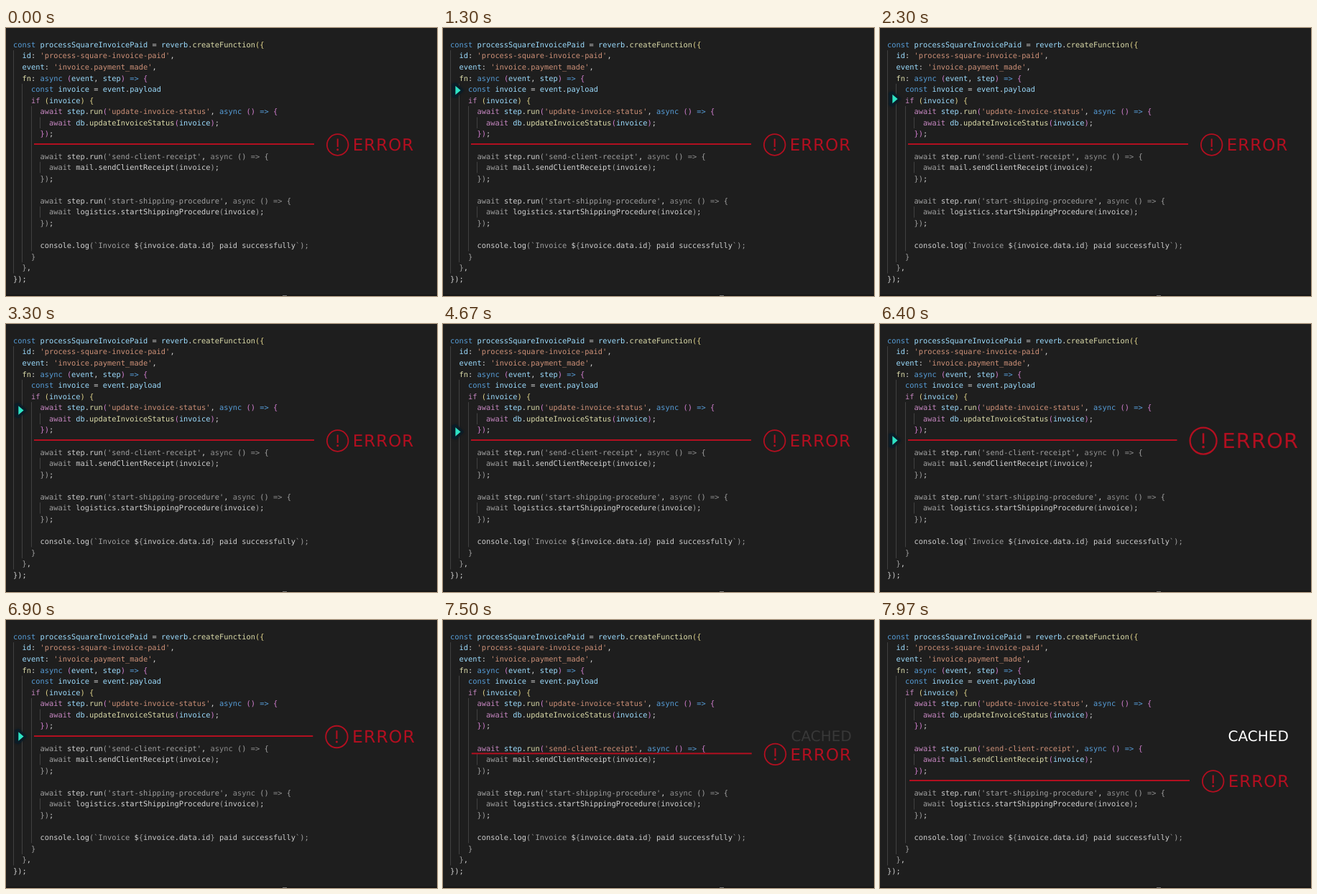
Animation of 600x374 px, one loop 8 s. Source, as an HTML page with a canvas:

```html
<!DOCTYPE html>
<html lang="en">
<head>
<meta charset="utf-8">
<title>Step function retry</title>
<style>
  html, body { margin: 0; width: 100%; height: 100%; overflow: hidden; background: #1e1e1e; }
  canvas { display: block; }
</style>
</head>
<body>
<canvas id="stage" width="600" height="374"></canvas>
<script>
const ctx = document.getElementById('stage').getContext('2d');
const WIDTH = 600, HEIGHT = 374, LOOP = 8000;
const LEFT = 10, CHAR = 6.24, BASELINE = 26.8, PITCH = 15.57;
const RED = '#b30f20';

const code = [
  "const processSquareInvoicePaid = reverb.createFunction({",
  "  id: 'process-square-invoice-paid',",
  "  event: 'invoice.payment_made',",
  "  fn: async (event, step) => {",
  "    const invoice = event.payload",
  "    if (invoice) {",
  "      await step.run('update-invoice-status', async () => {",
  "        await db.updateInvoiceStatus(invoice);",
  "      });",
  "",
  "      await step.run('send-client-receipt', async () => {",
  "        await mail.sendClientReceipt(invoice);",
  "      });",
  "",
  "      await step.run('start-shipping-procedure', async () => {",
  "        await logistics.startShippingProcedure(invoice);",
  "      });",
  "",
  "      console.log(`Invoice ${invoice.data.id} paid successfully`);",
  "    }",
  "  },",
  "});"
];

// First matching rule colours a token.
const rules = [
  [/^['`]/, '#ce9178'],
  [/^(const|async|=>)$/, '#569cd6'],
  [/^(await|if)$/, '#c586c0'],
  [/^(createFunction|run|log|fn|updateInvoiceStatus|sendClientReceipt|startShippingProcedure)$/, '#dcdcaa'],
  [/^\w/, '#9cdcfe'],
  [/^[(){}]$/, '#d37fd0'],
  [/./, '#d4d4d4']
];
const goldBracketRows = [0, 5, 21];

function toGray(hex) {
  const [r, g, b] = [1, 3, 5].map(i => parseInt(hex.slice(i, i + 2), 16));
  const level = Math.round(0.3 * r + 0.59 * g + 0.11 * b);
  return `rgb(${level},${level},${level})`;
}

const tokens = code.flatMap((line, row) =>
  [...line.matchAll(/'[^']*'|`[^$]*|\w+|=>|[^\s\w]/g)].map(match => {
    const text = match[0];
    const gold = goldBracketRows.includes(row) && /[(){}]/.test(text);
    const color = gold ? '#e2d58b' : rules.find(([pattern]) => pattern.test(text))[1];
    return { text, color, gray: toGray(color), x: LEFT + match.index * CHAR, y: BASELINE + row * PITCH };
  }));

const clamp = v => Math.min(1, Math.max(0, v));
const ramp = (t, from, to) => clamp((t - from) / (to - from));
const ease = (t, from, to) => (1 - Math.cos(Math.PI * ramp(t, from, to))) / 2;
const mix = (a, b, p) => a + (b - a) * p;

function drawGuides() {
  ctx.fillStyle = '#414141';
  const guide = (indent, firstRow, lastRow) =>
    ctx.fillRect(Math.round(LEFT + indent * CHAR), 15.5 + firstRow * PITCH, 1, (lastRow - firstRow + 1) * PITCH);
  guide(0, 1, 20);
  guide(2, 4, 19);
  guide(4, 6, 18);
  for (const row of [7, 11, 15]) guide(6, row, row);
}

function drawCode(top, bottom, shade) {
  ctx.save();
  ctx.beginPath();
  ctx.rect(0, top, WIDTH, bottom - top);
  ctx.clip();
  ctx.font = '10.365px "DejaVu Sans Mono", monospace';
  for (const token of tokens) {
    ctx.fillStyle = token[shade];
    ctx.fillText(token.text, token.x, token.y);
  }
  ctx.restore();
}

function polygon(points, color) {
  ctx.fillStyle = color;
  ctx.beginPath();
  points.forEach(([x, y]) => ctx.lineTo(x, y));
  ctx.fill();
}

function drawPointer(y, alpha) {
  ctx.save();
  ctx.globalAlpha = alpha;
  ctx.translate(0, y);
  ctx.shadowColor = '#0a1a25';
  ctx.shadowBlur = 3;
  polygon([[12.5, -9], [18, -10.5], [29, 0], [18, 10.5], [12.5, 9]], '#0b1c27');
  ctx.shadowBlur = 0;
  polygon([[17.3, -6.2], [24.6, 0], [17.3, 6.2]], '#2ee3c4');
  ctx.restore();
}

function drawError(y, shift, scale) {
  ctx.save();
  ctx.translate(shift, y);
  ctx.fillStyle = ctx.strokeStyle = RED;
  const lineEnd = 508 - 62 * scale - 17;
  ctx.fillRect(39, -1.5, lineEnd - 39, 2);

  ctx.translate(508, 0.5);
  ctx.scale(scale, scale);
  ctx.lineWidth = 1.8;
  ctx.beginPath();
  ctx.arc(-46.3, 0, 14.8, 0, 2 * Math.PI);
  ctx.stroke();
  ctx.fillRect(-47.3, -8.5, 2, 11.5);
  ctx.beginPath();
  ctx.arc(-46.3, 6.8, 1.5, 0, 2 * Math.PI);
  ctx.fill();
  ctx.font = '23px "DejaVu Sans", sans-serif';
  ctx.letterSpacing = '1px';
  ctx.fillText('ERROR', -25.3, 8.2);
  ctx.restore();
}

function drawCached(alpha) {
  ctx.save();
  ctx.globalAlpha = alpha;
  ctx.fillStyle = '#fff';
  ctx.font = '20px "DejaVu Sans", sans-serif';
  ctx.fillText('CACHED', 484.5, 169);
  ctx.restore();
}

function render(t) {
  const drop = ease(t, 7176, 7930);
  const errorY = mix(162.5, 224.5, drop);
  const scale = 1 + 0.25 * (ease(t, 5200, 5670) - ease(t, 6540, 7000));

  ctx.fillStyle = '#1e1e1e';
  ctx.fillRect(0, 0, WIDTH, HEIGHT);
  ctx.fillStyle = '#161616';
  ctx.fillRect(0, 372, WIDTH, 2);
  ctx.fillStyle = '#777';
  ctx.fillRect(385, 373, 6, 1);

  drawGuides();
  drawPointer(mix(86, 162.5, ease(t, 940, 5980)), ramp(t, 830, 1150) - ramp(t, 6950, 7300));
  drawCode(0, errorY, 'color');
  drawCode(errorY, HEIGHT, 'gray');
  drawError(errorY, 2 * drop, scale);
  drawCached(ramp(t, 7450, 7880));
}

ctx.textRendering = 'geometricPrecision';
const start = performance.now();
function tick() {
  render((performance.now() - start) % LOOP);
  requestAnimationFrame(tick);
}
tick();
</script>
</body>
</html>
```
